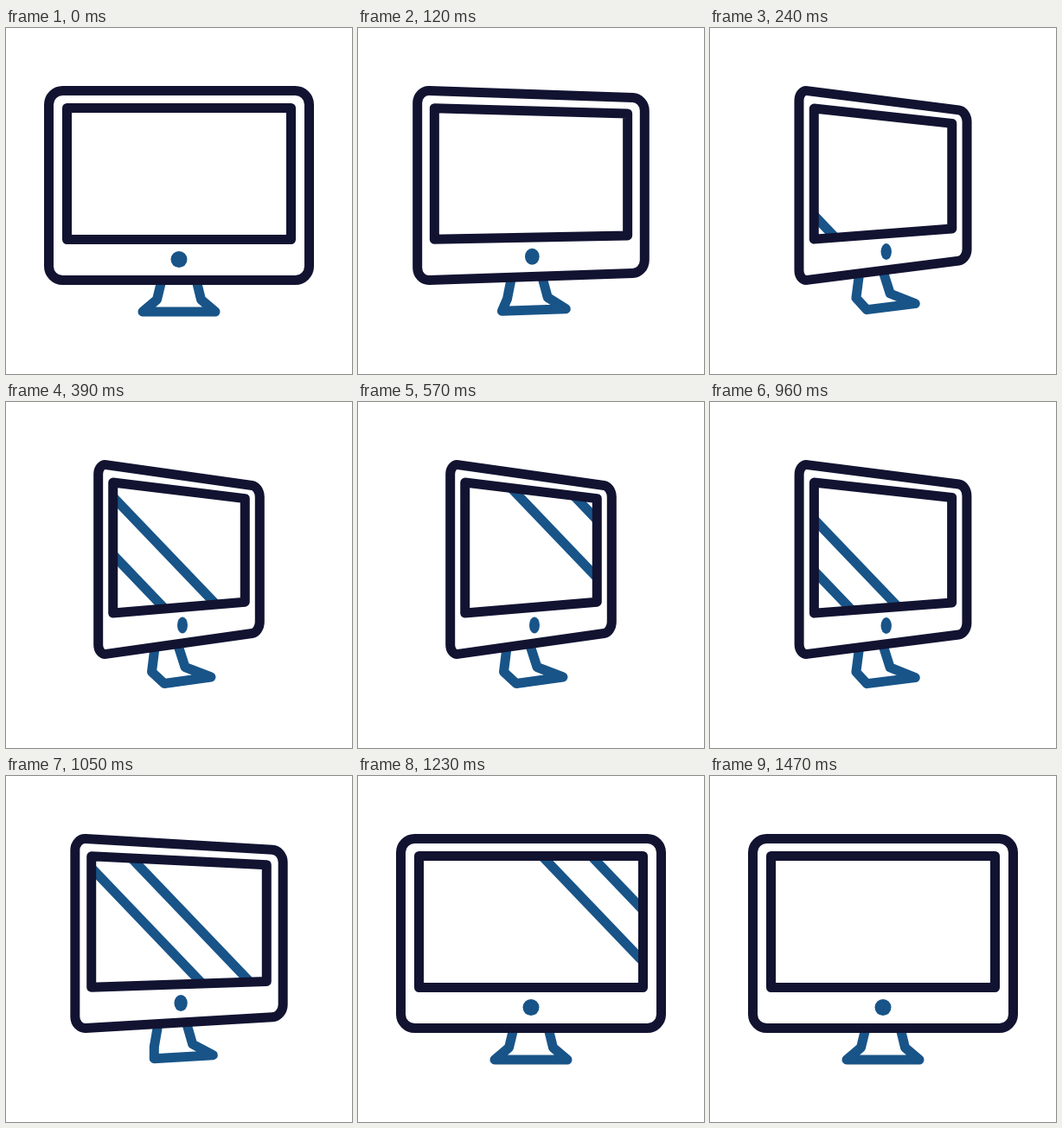
These frames come from a looping animation (400x400 px, 3.62 s). An HTML page:

```html
<!DOCTYPE html>
<html lang="en">
<head>
<meta charset="utf-8">
<title>Turning monitor</title>
<style>
  html, body { margin: 0; width: 100%; height: 100%; overflow: hidden; background: #fff; }
  svg { display: block; width: 100%; height: 100%; }
  path { fill: none; stroke: #121331; stroke-width: 11; stroke-linejoin: round; }
  .blue { stroke: #185488; }
  ellipse { fill: #185488; }
</style>
</head>
<body>
<svg viewBox="0 0 400 400">
  <clipPath id="glass"><path id="hole"/></clipPath>
  <g clip-path="url(#glass)"><path id="glare" class="blue"/></g>
  <path id="stand" class="blue"/>
  <path id="shell"/>
  <path id="screen"/>
  <ellipse id="button"/>
</svg>
<script>
const LOOP = 3620, STEP = 30, LAST = 1470;
const TURN = 293, BACK = 908;              // length of a turn, start of the return
const SWEEP = 600, SPEED = 0.7056;         // time between reflections, px per ms
const MID = 200, EYE = 182;                // turning axis and eye level

const leg = [[20, 291.5], [25.5, 314], [42, 328]];
const front = [
  ...leg.map(([x, y]) => [MID - x, y]),
  ...leg.map(([x, y]) => [MID + x, y]).reverse()
];
const turned = [[172, 284], [168.5, 312], [183, 325.5], [237, 318], [207, 306.5], [198.5, 280]];

const $ = id => document.getElementById(id);
const mix = (a, b, p) => a + (b - a) * p;
const between = (a, b, p) => [mix(a[0], b[0], p), mix(a[1], b[1], p)];
const line = pts => "M" + pts.map(v => v.join(" ")).join("L");
const ease = x => x <= 0 ? 0 : x >= 1 ? 1 : x < 0.5 ? 2 * x * x : 1 - 2 * (1 - x) ** 2;

// Corners of an upright box; the far (right) side shrinks as it turns.
function panel(half, top, bottom, squeeze, p) {
  const corners = [[-half, top], [half, top], [half, bottom], [-half, bottom]];
  return corners.map(([x, y]) => [
    MID + x * mix(1, squeeze, p),
    EYE + (y - EYE) * mix(1, 0.89 - x * 0.0008, p)
  ]);
}

function toward(a, b, dist) {
  return between(a, b, dist / Math.hypot(b[0] - a[0], b[1] - a[1]));
}

function rounded(pts, rx, ry) {
  const parts = pts.map((v, i) => {
    const prev = pts[(i + 3) % 4], next = pts[(i + 1) % 4];
    const [r1, r2] = i % 2 ? [rx, ry] : [ry, rx];
    const curve = [
      toward(v, prev, r1 * 0.45), toward(v, next, r2 * 0.45), toward(v, next, r2)
    ];
    return toward(v, prev, r1).join(" ") + "C" + curve.map(c => c.join(" ")).join(" ");
  });
  return "M" + parts.join("L") + "Z";
}

// A slanted stripe that would meet the top edge of the stage at x.
const stripe = x => `M${x} 0l382.8 400`;

function draw(t) {
  const p = ease(t / TURN) - ease((t - BACK) / TURN);
  const glass = line(panel(129.5, 92.5, 244.5, 0.589, p)) + "Z";
  const shell = panel(150.5, 72.5, 291.5, 0.62, p);
  $("shell").setAttribute("d", rounded(shell, mix(16, 9, p), mix(16, 12, p)));
  $("screen").setAttribute("d", glass);
  $("hole").setAttribute("d", glass);
  $("stand").setAttribute("d", line(front.map((v, i) => between(v, turned[i], p))));

  const button = { cx: mix(MID, 204, p), cy: mix(267.5, 258, p), rx: mix(9.5, 6, p), ry: 9.5 };
  for (const key in button) $("button").setAttribute(key, button[key]);

  // The reflection crosses once while turned, then again on the way back.
  const first = t < 825;
  const x = (t + (first ? SWEEP : 0) - 1054) * SPEED;
  const gap = first ? 64 : 57;
  $("glare").setAttribute("d", stripe(x) + stripe(x + gap));
}

const start = performance.now();
function tick() {
  const t = (performance.now() - start) % LOOP;
  // Before the turn and after the return the reflection lies outside the screen.
  draw(t < LAST ? Math.floor(t / STEP) * STEP : LAST);
  requestAnimationFrame(tick);
}
tick();
</script>
</body>
</html>
```
